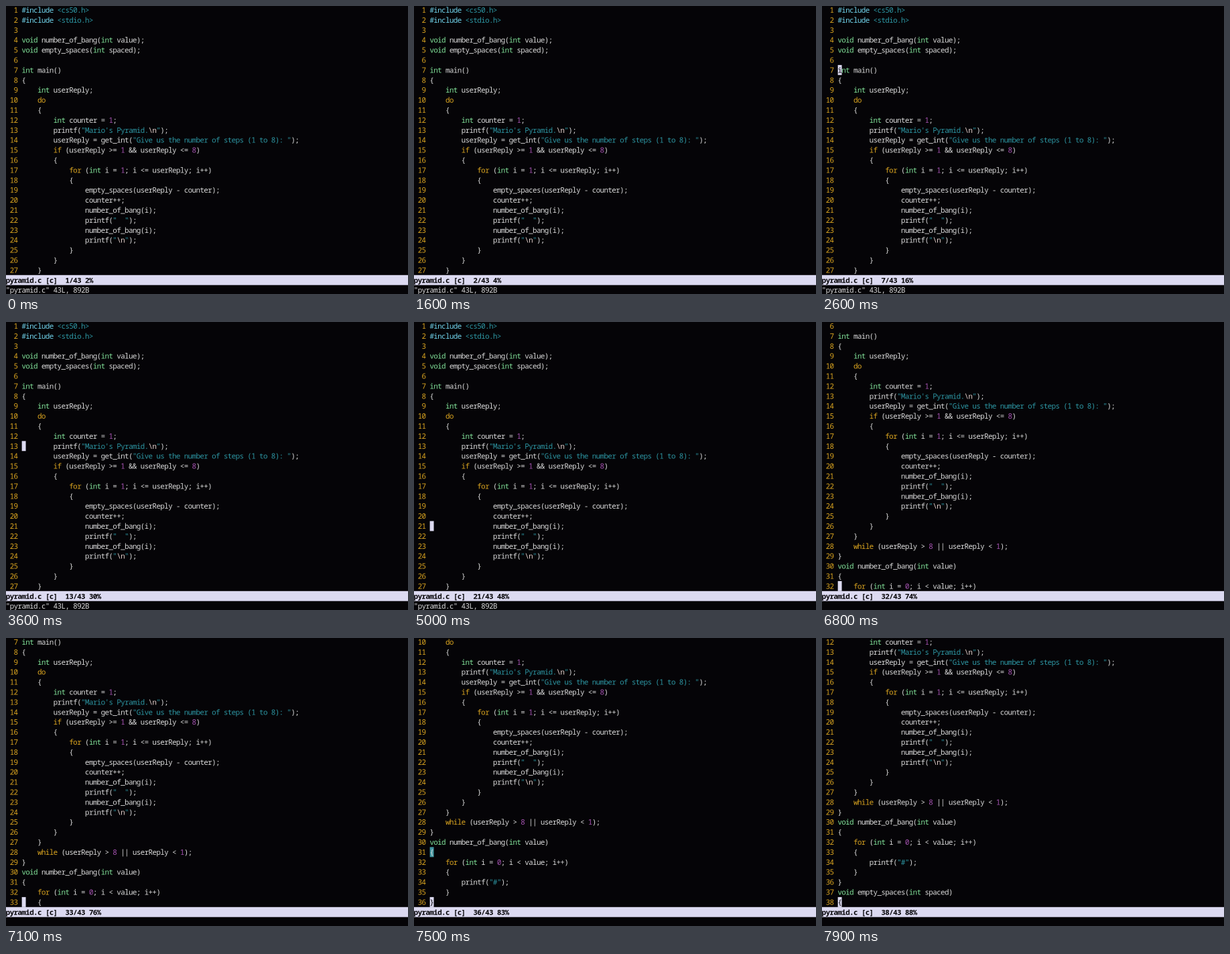
An HTML page with a canvas for the animation above (8 s loop, 600x429 px).

```html
<!DOCTYPE html>
<html lang="en">
<head>
<meta charset="utf-8">
<title>Editor scrolling</title>
<style>
  html, body { margin: 0; width: 100%; height: 100%; overflow: hidden; background: #050407; }
  canvas { display: block; width: 600px; height: 429px; }
</style>
</head>
<body>
<canvas id="stage"></canvas>
<script>
const SOURCE = String.raw`#include <cs50.h>
#include <stdio.h>

void number_of_bang(int value);
void empty_spaces(int spaced);

int main()
{
    int userReply;
    do
    {
        int counter = 1;
        printf("Mario's Pyramid.\n");
        userReply = get_int("Give us the number of steps (1 to 8): ");
        if (userReply >= 1 && userReply <= 8)
        {
            for (int i = 1; i <= userReply; i++)
            {
                empty_spaces(userReply - counter);
                counter++;
                number_of_bang(i);
                printf("  ");
                number_of_bang(i);
                printf("\n");
            }
        }
    }
    while (userReply > 8 || userReply < 1);
}
void number_of_bang(int value)
{
    for (int i = 0; i < value; i++)
    {
        printf("#");
    }
}
void empty_spaces(int spaced)
{`.split("\n");

const WIDTH = 600, HEIGHT = 429, LOOP = 8000, TOTAL = 43, ROWS = 27, GUTTER = 4;
const CELL = 5.912, ROW = 14.9, TOP = -1.5, BASELINE = 11.5;
const SCALE = 2; // drawn larger so that baselines can fall between pixels
const FONT = "semi-condensed 10.94px 'Noto Sans Mono', monospace";
const COLOR = {
  back: "#050407", text: "#dadada", number: "#dba520", bar: "#dcdaf1", match: "#4298a2",
  pre: "#70d2ea", string: "#2d96a3", special: "#e6d2ce", type: "#82e39a",
  keyword: "#dba520", digit: "#a854b4"
};
const TOKEN = new RegExp([
  /(?<pre>#include)/,
  /(?<special>\\n)/,
  /(?<string><[\w.]+>|(?<=\\n)"|"[^"\\]*"?)/,
  /(?<type>\b(?:int|void)\b)/,
  /(?<keyword>\b(?:do|if|for|while)\b)/,
  /(?<digit>\b\d+\b)/,
  /(?<text>\w+|[^\w])/
].map(r => r.source).join("|"), "g");

// Times at which the cursor steps down to lines 2, 3, 4, ...
const STEPS = [
  1000, 1800, 2000, 2200, 2400, 2600, 2800, 3000, 3200, 3300, 3400, 3600, 3900,
  4100, 4300, 4400, 4600, 4700, 4900, 5000, 5200, 5300, 5500, 5700, 5800, 6000,
  6200, 6300, 6500, 6600, 6800, 7000, 7200, 7300, 7500, 7700, 7900
];
const HIDDEN = [[0, 200], [800, 1000], [1600, 1800]];
const PAIRS = { 29: 8, 36: 31 };

const canvas = document.getElementById("stage");
canvas.width = WIDTH * SCALE;
canvas.height = HEIGHT * SCALE;
const ctx = canvas.getContext("2d");
ctx.scale(SCALE, SCALE);
ctx.textAlign = "center";

const rowTop = row => TOP + row * ROW;

function write(text, col, row, color) {
  ctx.fillStyle = color;
  [...text].forEach((char, i) => {
    if (char !== " ") ctx.fillText(char, (col + i + 0.5) * CELL, rowTop(row) + BASELINE);
  });
}

function writeCode(line, row) {
  write(String(line).padStart(3), 0, row, COLOR.number);
  for (const token of SOURCE[line - 1].matchAll(TOKEN)) {
    const kind = Object.keys(token.groups).find(k => token.groups[k] !== undefined);
    write(token[0], GUTTER + token.index, row, COLOR[kind]);
  }
}

function block(row, char, back, color) {
  ctx.fillStyle = back;
  ctx.fillRect(GUTTER * CELL, rowTop(row), CELL, ROW);
  write(char, GUTTER, row, color);
}

function draw(time) {
  const line = 1 + STEPS.filter(step => step <= time).length;
  const first = Math.max(1, line - ROWS + 1);
  const firstChar = n => SOURCE[n - 1][0] || " ";

  ctx.fillStyle = COLOR.back;
  ctx.fillRect(0, 0, WIDTH, HEIGHT);
  ctx.font = FONT;
  for (let row = 0; row < ROWS; row++) writeCode(first + row, row);

  const pair = PAIRS[line];
  if (pair >= first) block(pair - first, firstChar(pair), COLOR.match, COLOR.text);
  if (!HIDDEN.some(([from, to]) => time >= from && time < to)) {
    block(line - first, firstChar(line), COLOR.bar, COLOR.back);
  }
  if (first === 1) write('"pyramid.c" 43L, 892B', 0, ROWS + 1, COLOR.text);

  ctx.fillStyle = COLOR.bar;
  ctx.fillRect(0, rowTop(ROWS), WIDTH, ROW);
  ctx.font = "bold " + FONT;
  const percent = Math.floor(line * 100 / TOTAL);
  write(`pyramid.c [c]  ${line}/${TOTAL} ${percent}%`, 0, ROWS, COLOR.back);
}

const start = performance.now();
function tick() {
  draw((performance.now() - start) % LOOP);
  requestAnimationFrame(tick);
}
tick();
</script>
</body>
</html>
```
